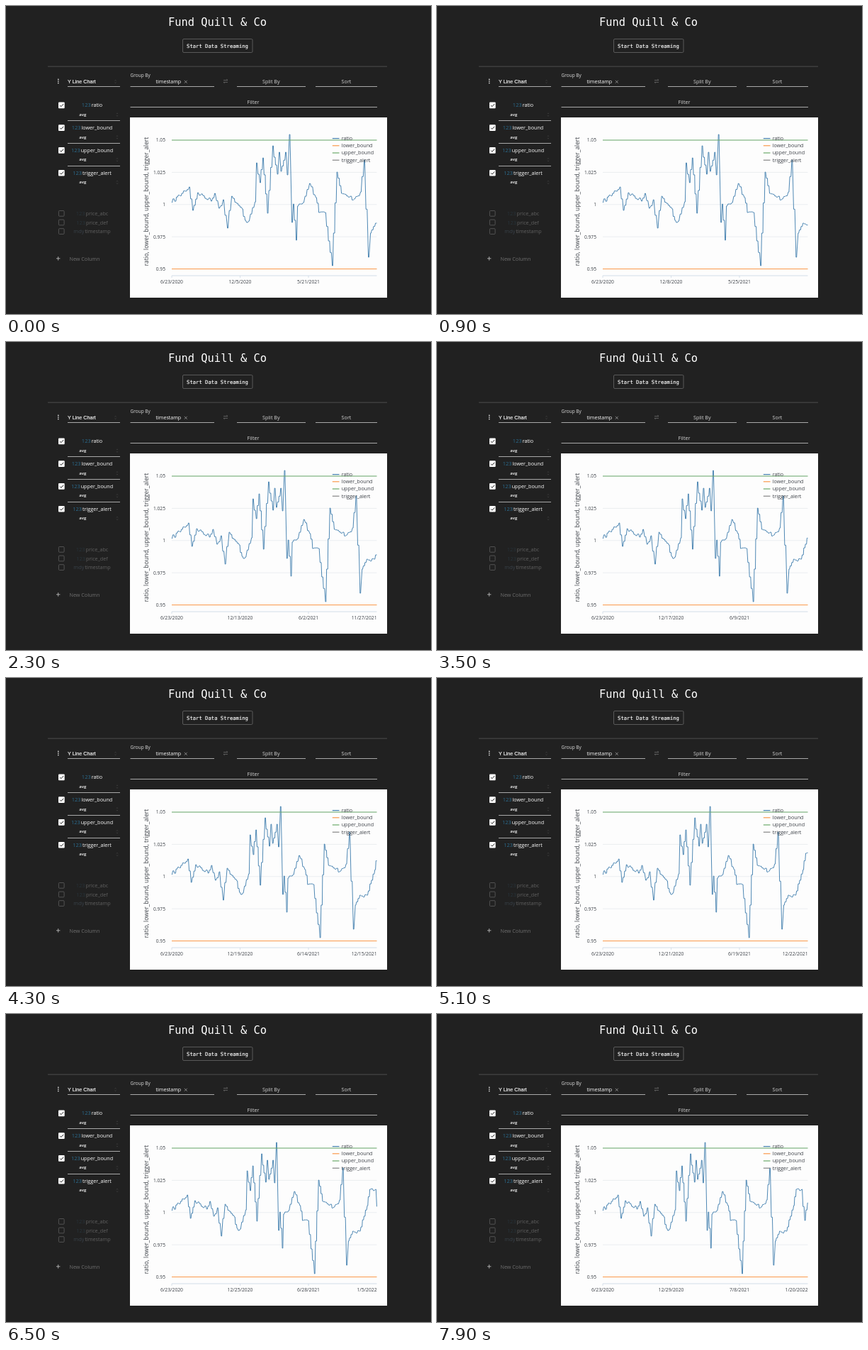
An HTML page for the animation above (8000 ms loop, 600 by 434 pixels).

```html
<!DOCTYPE html>
<html lang="en">
<head>
<meta charset="utf-8">
<title>Streaming chart</title>
<style>
  html, body { margin: 0; width: 100%; height: 100%; overflow: hidden; background: #212121; }
  svg { display: block; width: 100%; height: 100%; }
  text { font-family: "Open Sans", "Noto Sans", sans-serif; }
  .mono { font-family: "DejaVu Sans Mono", monospace; }
  .arial { font-family: "Liberation Sans", Arial, sans-serif; }
  .firm { stroke: #fff; stroke-width: 0.15; }
</style>
</head>
<body>
<svg id="stage" viewBox="0 0 600 434"></svg>
<script>
const stage = document.getElementById('stage');
const LOOP = 8000, STEP = 100;
const LEFT = 234, WIDTH = 289.5, RIGHT = LEFT + WIDTH;

function add(tag, attrs, text, parent = stage) {
  const node = document.createElementNS('http://www.w3.org/2000/svg', tag);
  for (const key in attrs) node.setAttribute(key, attrs[key]);
  if (text !== undefined) node.textContent = text;
  return parent.appendChild(node);
}
const line = (x1, y1, x2, y2, stroke, width = 1) =>
  add('line', { x1, y1, x2, y2, stroke, 'stroke-width': width });
const rect = (x, y, width, height, attrs) => add('rect', { x, y, width, height, ...attrs });
const stroked = (d, stroke, width) => add('path', { d, stroke, 'stroke-width': width, fill: 'none' });
const label = (x, y, size, fill, text, attrs = {}) =>
  add('text', { x, y, 'font-size': size, fill, ...attrs }, text);
const MID = { 'text-anchor': 'middle' }, END = { 'text-anchor': 'end' };

// Header
label(298.5, 28, 15.4, '#fff', 'Fund Quill & Co', { ...MID, class: 'mono' });
rect(249.5, 46.5, 98.5, 19, { rx: 1.5, fill: 'none', stroke: '#606060', 'stroke-width': 0.9 });
label(298.5, 58.7, 7.22, '#fff', 'Start Data Streaming', { ...MID, class: 'mono firm' });
line(59, 85.2, 538, 85.2, '#4c4c4c');

// Toolbar
const underline = (x1, x2, y) => line(x1, y, x2, y, '#b8b8b8', 0.9);
for (let i = -1; i < 2; i++) add('circle', { cx: 73.8, cy: 106 + i * 2.6, r: 0.85, fill: '#ddd' });
label(87, 108.8, 7.2, '#fff', 'Y Line Chart', { class: 'arial firm' });
label(175.5, 100.2, 6.5, '#ddd', 'Group By');
label(211.5, 108.8, 7.1, '#fff', 'timestamp');
stroked('M251.8 104.8l4 4m0-4l-4 4', '#aaa', 0.7);
stroked('M307 104.6h6l-1.6-1.4M313 107.4h-6l1.6 1.4', '#777', 0.7);
label(374.3, 108.8, 7.2, '#d4d4d4', 'Split By', MID);
label(480.5, 108.8, 7.2, '#d4d4d4', 'Sort', MID);
label(349, 137.6, 7.2, '#d4d4d4', 'Filter', MID);
for (const [x1, x2] of [[87, 161], [175.5, 294], [326, 423], [437, 524]]) underline(x1, x2, 113.5);
underline(175.5, 524, 142.5);

// Sidebar
function column(y, type, name, typeColor, color) {
  const text = label(121.5, y, 7.2, color, '', MID);
  add('tspan', { fill: typeColor, 'font-size': 7.5 }, type, text);
  add('tspan', { dx: 0.9 }, name, text);
}
const arrows = (x, y) =>
  stroked(`M${x - 1} ${y - 1}l1-1.3 1 1.3M${x - 1} ${y + 1}l1 1.3 1-1.3`, '#505050', 0.5);
arrows(154.5, 106.5);
['ratio', 'lower_bound', 'upper_bound', 'trigger_alert'].forEach((name, i) => {
  const y = 139.7 + i * 31.8;
  rect(74, y - 4.2, 8.7, 8.7, { rx: 1, fill: '#fff' });
  stroked(`M76 ${y + 0.2}l1.8 1.8 3.4-3.7`, '#222', 1);
  column(y + 2.5, '123', name, '#2b6d90', '#fff');
  label(103.2, y + 15.1, 6, '#fff', 'avg', { 'font-weight': 600 });
  arrows(157, y + 13.4);
  if (i < 3) underline(87, 161, 161.5 + i * 32);
});
[['123', 'price_abc'], ['123', 'price_def'], ['mdy', 'timestamp']].forEach(([type, name], i) => {
  const y = 292.3 + i * 12.6;
  rect(74.4, y - 3.8, 7.7, 7.7, { rx: 1, fill: 'none', stroke: '#585858', 'stroke-width': 0.9 });
  column(y + 2.6, type, name, i < 2 ? '#28343b' : '#39424a', '#606060');
});
stroked('M71 355.8h5.4m-2.7-2.7v5.4', '#aaa', 1);
label(89.5, 358.5, 7.2, '#707070', 'New Column');

// Chart
rect(175, 157, 363, 254, { fill: '#fdfdfd' });
const INK = '#3c4047', BLUE = '#4682b0', ORANGE = '#fb9a4b', GREEN = '#6cab6a', AXIS = '#cfdae6';
for (let i = 0; i < 5; i++) {
  const y = 189 + i * 45.38;
  line(LEFT, y, RIGHT, y, '#e9edf0', 0.9);
  label(225, y + 2.4, 6.7, INK, String(1.05 - i * 0.025).slice(0, 5).replace(/\.?0+$/, ''), END);
}
label(0, 0, 8.35, INK, 'ratio, lower_bound, upper_bound, trigger_alert',
  { ...MID, transform: 'translate(201.3 275.5) rotate(-90)' });
line(LEFT, 380, RIGHT, 380, AXIS, 0.9);
for (let i = 0; i < 3; i++) line(LEFT + i * WIDTH / 3, 380, LEFT + i * WIDTH / 3, 383, AXIS, 0.8);
const curve = stroked('', BLUE, 0.95);
line(LEFT, 370.5, RIGHT, 370.5, ORANGE, 1.2);
line(LEFT, 189, RIGHT, 189, GREEN, 1.2);
[['ratio', BLUE], ['lower_bound', ORANGE], ['upper_bound', GREEN], ['trigger_alert', '#858585']]
  .forEach(([name, color], i) => {
    const y = 186.6 + i * 10.2;
    line(460.8, y, 470.5, y, color, 1.2);
    label(473.7, y + 2.4, 7.2, INK, name);
  });
label(LEFT, 390.8, 6.75, INK, '6/23/2020', MID);

// Turning points of the ratio: distance along the axis at the start, height on the stage
const turns = [
  [0, 277], [25, 255], [30, 288], [37, 263], [56, 275], [61, 264], [67, 285], [73, 273],
  [79, 313], [85, 268], [100, 286], [104, 302], [109, 303], [118, 276], [120, 221], [125, 249],
  [129, 214], [135.5, 292], [143, 197], [149.5, 237], [152, 206], [154.5, 233], [161, 206],
  [163.5, 238], [166.5, 181], [170, 305], [172, 279], [176, 330], [178, 282], [186, 277],
  [195, 250], [204, 270], [208, 291], [217, 291], [227, 366], [233.5, 234], [240, 264],
  [258, 272], [267, 262], [272, 217], [278, 354], [281, 320], [288, 306], [299, 306],
  [311, 270], [315, 247], [324, 247], [329, 291], [333.5, 266]
];

// Seeded stairs lead from each turning point to the next
let seed = 7;
const random = () => (seed = seed * 16807 % 2147483647) / 2147483647;
const stairs = [];
turns.forEach(([x, y], i) => {
  const [nextX, nextY] = turns[i + 1] || [x, y];
  const count = Math.max(1, Math.round((nextX - x) / 2.6));
  for (let j = 0; j < count; j++) {
    const hold = j ? 0.85 : 0.4;
    const pos = x + (nextX - x) * j / count;
    const level = y + (nextY - y) * j / count + (j ? (random() - 0.5) * 6 : 0);
    stairs.push([Math.max(0, pos - hold), level], [pos + hold, level]);
  }
});

// Days from the first date to each tick; growth is slightly uneven
const ticks = [
  { from: 165, to: 189, power: 0.9 },
  { from: 332, to: 380, power: 1.15 },
  { from: 505.8, to: 576, power: 1.2 }
].map((tick, i) => ({
  ...tick,
  node: label(LEFT + (i + 1) * WIDTH / 3, 390.8, 6.75, INK, '', i < 2 ? MID : END)
}));
function dateText(days) {
  const d = new Date(Date.UTC(2020, 5, 23 + days));
  return `${d.getUTCMonth() + 1}/${d.getUTCDate()}/${d.getUTCFullYear()}`;
}

function draw(t) {
  const progress = t / (LOOP - STEP);
  const rows = 500 + 76 * progress;
  const scale = 500 / rows;
  const shown = stairs.filter(([pos]) => pos * scale <= WIDTH);
  const points = shown.map(([pos, y]) => `${(LEFT + pos * scale).toFixed(2)} ${y.toFixed(1)}`);
  const lastLevel = shown[shown.length - 1][1];
  curve.setAttribute('d', `M${points.join('L')}H${RIGHT}`.replace('H' + RIGHT, `L${RIGHT} ${lastLevel.toFixed(1)}`));
  ticks.forEach(({ node, from, to, power }, i) => {
    const visible = i < 2 || rows % 3 < 1.6;
    node.textContent = visible ? dateText(Math.round(from + (to - from) * progress ** power)) : '';
  });
}

const start = performance.now();
function frame(now) {
  const t = Math.max(0, now - start) % LOOP;
  draw(Math.floor(t / STEP) * STEP);
  requestAnimationFrame(frame);
}
draw(0);
requestAnimationFrame(frame);
</script>
</body>
</html>
```
